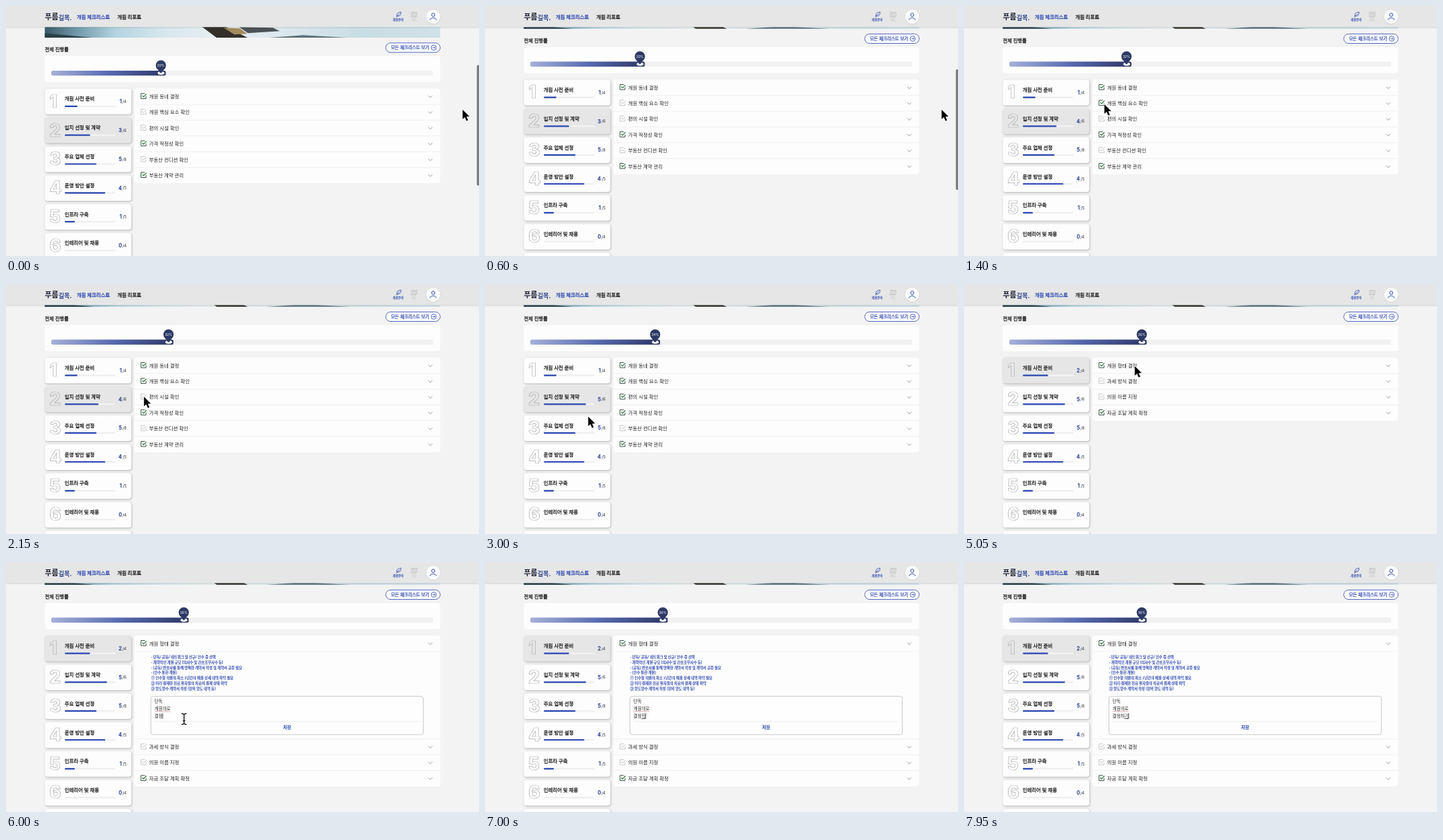
These frames come from a looping animation (700 by 371 pixels, 8 s). An HTML page with a canvas:

```html
<!DOCTYPE html>
<html lang="ko">
<head>
<meta charset="utf-8">
<title>개원 체크리스트</title>
<style>
html, body { margin: 0; width: 100%; height: 100%; overflow: hidden; background: #f3f3f3; }
canvas { display: block; width: 700px; height: 371px; }
</style>
</head>
<body>
<canvas id="stage"></canvas>
<script>
const W = 700, H = 371, LOOP = 8000;
const canvas = document.getElementById('stage');
const ctx = canvas.getContext('2d');
const dpr = window.devicePixelRatio || 1;
canvas.width = Math.round(W * dpr);
canvas.height = Math.round(H * dpr);

const CJK = '"Noto Sans CJK KR", "Noto Sans CJK JP", sans-serif';
const FONT = 'Inter, ' + CJK;
const BLUE = '#2b46b0', INK = '#222', NAVY = '#2d3965', LINE = '#ededed';

const CHECK = { first: 1250, second: 2200, third: 4450 };
const TAB = 3400, OPEN = 5100, FOCUS = 5900;

const cards = [
  ['개원 사전 준비', 1, 4], ['입지 선정 및 계약', 3, 6], ['주요 업체 선정', 5, 8],
  ['운영 방안 설정', 4, 5], ['인프라 구축', 1, 5], ['인테리어 및 채용', 0, 4], ['', 0, 4]
];
// Each item: label and the time from which it is checked
const siteItems = [
  ['개원 동네 결정', 0], ['개원 핵심 요소 확인', CHECK.first], ['편의 시설 확인', CHECK.second],
  ['가격 적정성 확인', 0], ['부동산 컨디션 확인', Infinity], ['부동산 계약 관리', 0]
];
const prepItems = [
  ['개원 형태 결정', CHECK.third], ['과세 방식 결정', Infinity],
  ['의원 이름 지정', Infinity], ['자금 조달 계획 확정', 0]
];
const notes = [
  '- 단독/ 공동/ 네트워크 및 신규/ 인수 중 선택',
  '- 개략적인 개원 규모 (의사수 및 간호조무사수 등)',
  '- [공동] 변호사를 통해 명확한 계약서 작성 및 계약서 공증 필요',
  '- [인수 통한 개원]',
  '① 인수할 의원의 최소 1년간의 매출 상세 내역 파악 필요',
  '② 미리 결제한 진료 환자들의 치료비 결제 상태 파악',
  '③ 양도양수 계약서 작성 (장비 양도 내역 등)'
];
const typing = [[0, ''], [6500, 'ㅎ'], [6700, '하'], [7000, '학'], [7200, '하기']];
const route = [
  [0, 676.5, 154.5], [750, 676.5, 154.5], [1230, 204, 145.5], [1400, 208.5, 146.5],
  [1650, 208.5, 146.5], [2050, 205, 168], [2550, 205, 168], [3000, 153.5, 197.5],
  [3330, 131, 132], [3650, 131, 132], [4200, 207, 121.5], [4550, 207, 121.5],
  [4950, 253.5, 122.5], [5200, 253.5, 122.5], [5800, 263.5, 233], [8000, 263.5, 233]
];

const clamp = v => Math.max(0, Math.min(1, v));
const smooth = u => u * u * (3 - 2 * u);
const ramp = (t, start, length) => smooth(clamp((t - start) / length));

function text(str, x, y, size, color = INK, weight = 400, align = 'left', family = FONT) {
  ctx.font = `${weight} ${size}px ${family}`;
  ctx.letterSpacing = `${-0.01 * size}px`;
  ctx.textAlign = align;
  ctx.fillStyle = color;
  const base = y + size * 0.37;
  ctx.fillText(str, x, base);
  // Thicken the strokes for medium weight
  if (weight === 500) {
    ctx.strokeStyle = color;
    ctx.lineWidth = size * 0.035;
    ctx.strokeText(str, x, base);
  }
  return ctx.measureText(str).width;
}

function box(x, y, w, h, r, fill, stroke, lw = 0.8) {
  ctx.beginPath();
  ctx.roundRect(x, y, w, h, r);
  if (fill) { ctx.fillStyle = fill; ctx.fill(); }
  if (stroke) { ctx.strokeStyle = stroke; ctx.lineWidth = lw; ctx.stroke(); }
}

function poly(points, color, lw, close) {
  ctx.beginPath();
  points.forEach(([x, y], i) => i ? ctx.lineTo(x, y) : ctx.moveTo(x, y));
  if (close) ctx.closePath();
  if (lw) { ctx.strokeStyle = color; ctx.lineWidth = lw; ctx.stroke(); }
  else { ctx.fillStyle = color; ctx.fill(); }
}

function disc(x, y, r, fill, stroke, lw) {
  box(x - r, y - r, 2 * r, 2 * r, r, fill, stroke, lw);
}

function shadow(color, blur, dx, dy) {
  ctx.shadowColor = color;
  ctx.shadowBlur = blur * dpr;
  ctx.shadowOffsetX = dx * dpr;
  ctx.shadowOffsetY = dy * dpr;
}

function gradient(x0, x1, stops) {
  const g = ctx.createLinearGradient(x0, 0, x1, 0);
  stops.forEach(([p, c]) => g.addColorStop(p, c));
  return g;
}

function drawBanner() {
  ctx.save();
  ctx.beginPath();
  ctx.rect(57.5, 0, 585, 33.8);
  ctx.clip();
  ctx.fillStyle = gradient(57, 643, [
    [0, '#3a5866'], [0.08, '#6f98aa'], [0.18, '#b4d3e0'], [0.3, '#d6e7ee'],
    [0.42, '#e6eef0'], [0.6, '#dbe8ed'], [0.8, '#c9dde6'], [1, '#cfe1e9']
  ]);
  ctx.fillRect(57, 0, 586, 34);
  poly([[57, 27], [130, 34], [57, 34]], '#2b4048', 0, true);
  poly([[288, 16], [322, 16], [358, 34], [312, 34]], '#33302c', 0, true);
  poly([[322, 19], [346, 20], [357, 28], [338, 29]], '#a58a5e', 0, true);
  poly([[345, 18], [395, 19], [405, 24], [358, 27]], '#4c5256', 0, true);
  poly([[385, 34], [440, 30], [510, 34]], '#5c727b', 0, true);
  ctx.restore();
}

function drawProgress(value, label) {
  text('전체 진행률', 57.5, 51, 7.3, INK, 500);
  box(562, 41.5, 80.5, 14, 7, '#fefefe', BLUE, 0.8);
  text('모든 체크리스트 보기', 569.7, 48.5, 6.5, BLUE, 500);
  disc(633, 48.5, 3.8, null, BLUE, 0.8);
  poly([[630.8, 48.5], [635, 48.5]], BLUE, 0.7);
  poly([[633.3, 46.7], [635.1, 48.5], [633.3, 50.3]], BLUE, 0.7);

  box(57.5, 61, 585, 38.8, 4, '#fdfdfd');
  box(67, 82.6, 565, 7.4, 2.5, '#f1f1f1');
  const end = 67 + 5.65 * value, x = end - 7.3;
  box(67, 82.6, end - 67, 7.4, 2.5,
    gradient(67, end, [[0, '#a5b1d9'], [0.5, '#586bb0'], [1, '#2d3766']]));
  ctx.beginPath();
  ctx.ellipse(x + 0.3, 86.3, 5, 2.5, 0, 0, 7);
  ctx.fillStyle = '#fff';
  ctx.fill();
  poly([[x - 6.5, 78], [x + 6.5, 78], [x + 1.6, 85.3], [x, 86.4], [x - 1.6, 85.3]], NAVY, 0, true);
  disc(x, 74.8, 7.6, NAVY);
  text(label + '%', x, 74.7, 5.1, '#fff', 400, 'center');
}

function drawCard(i, done, shown, selected) {
  const [title, , total] = cards[i];
  const y = 109.5 + 42.8 * i;
  const shade = Math.round(253 - 23 * selected);
  shadow('rgba(0,0,0,.28)', 3, 0.7, 1);
  box(57.5, y, 128, 38, 4, `rgb(${shade},${shade},${shade})`);
  shadow('transparent', 0, 0, 0);

  ctx.font = `800 26.5px ${FONT}`;
  ctx.letterSpacing = '0px';
  ctx.textAlign = 'left';
  ctx.strokeStyle = '#adadad';
  ctx.lineWidth = 0.7;
  ctx.strokeText(i + 1, 64.2, y + 27.9);

  text(title, 86.8, y + 14.9, 7.4, INK, 500);
  box(87, y + 25, 75, 2.2, 1.1, selected > 0.5 ? '#f4f4f4' : '#eeeeee');
  if (done > 0) box(87, y + 25, 75 * done / total, 2.2, 1.1, BLUE);
  text('/' + total, 178.2, y + 18.9, 6.1, '#333', 400, 'right');
  text(shown, 171.4, y + 18.6, 7.5, '#2a3f96', 500, 'right');
}

function drawItem([label, since], y, t) {
  const on = t >= since;
  ctx.lineJoin = 'round';
  poly([[205.6, y - 4.6], [199.8, y - 4.6], [199.8, y + 3.1], [207.2, y + 3.1], [207.2, y - 0.4]],
    on ? '#2a4035' : '#bababa', on ? 0.9 : 0.8);
  poly([[201.7, y - 1.5], [203.5, y + 0.5], [207.8, y - 3.8]], on ? '#1c7034' : '#b4b4b4', on ? 1.1 : 0.9);
  text(label, 211.8, y - 0.2, 7.4, INK, 400);
  poly([[624.9, y - 1.4], [628, y + 1.6], [631.1, y - 1.4]], '#8a8a8a', 0.8);
}

function drawEditor(t) {
  notes.forEach((line, i) => text(line, 214.8, 141 + 7.78 * i, 5.4, BLUE, 500, 'left', CJK));
  box(214.5, 199.3, 403, 56.8, 3, '#fefefe', '#bbb', 0.8);
  poly([[220, 236.8], [613, 236.8]], '#e6e6e6', 0.7);
  text('저장', 416, 245.8, 6.6, BLUE, 600, 'center');
  text('단독', 219.8, 206.9, 6.5);
  const spell = text('개원의로', 219.8, 217.6, 6.5);
  const typed = typing.filter(step => t >= step[0]).pop()[1];
  const end = 219.8 + text('결정' + typed, 219.8, 228.2, 6.5);
  if (t < FOCUS) return;
  poly([[220, 222], [219.8 + spell, 222]], '#d39a9a', 0.8);
  if (typed) poly([[end - 5.9, 232.5], [end, 232.5]], '#222', 0.8);
  const blinkOn = typed ? t < 7700 || t >= 7900 : (t - FOCUS) % 1000 < 500;
  if (blinkOn) poly([[end + 0.3, 224.3], [end + 0.3, 232.6]], '#222', 0.7);
}

function drawList(t) {
  const items = t < TAB ? siteItems : prepItems;
  const open = t >= OPEN, gap = open ? 130 : 0, row = 23.4;
  box(190, 109.3, 452.5, row * items.length + gap, 4, '#fdfdfd');
  items.forEach((item, i) => {
    const top = 109.3 + row * i + (i ? gap : 0);
    if (i) poly([[190, top], [642.5, top]], LINE, 0.8);
    drawItem(item, top + 11.8, t);
  });
  if (open) {
    poly([[190, 132.7], [642.5, 132.7]], '#f3f3f3', 0.8);
    drawEditor(t);
  }
}

function drawHeader() {
  shadow('rgba(0,0,0,.2)', 2.5, 0, 0.8);
  ctx.fillStyle = '#e6e6e6';
  ctx.fillRect(0, 0, W, 31.3);
  shadow('transparent', 0, 0, 0);
  text('푸름', 57.6, 16, 10.9, '#1b1f30', 900);
  text('길목.', 77.8, 17.2, 9.1, '#2b3f8e', 800);
  text('개원 체크리스트', 104.7, 16, 7.4, BLUE, 500);
  text('개원 리포트', 164.7, 16, 7.4, '#151515', 500);

  // Feather
  ctx.beginPath();
  ctx.moveTo(577.3, 16.5);
  ctx.lineTo(582.5, 11.6);
  ctx.moveTo(578.4, 15.2);
  ctx.quadraticCurveTo(577.5, 9.4, 584.6, 9);
  ctx.quadraticCurveTo(585, 15.4, 578.4, 15.2);
  ctx.strokeStyle = BLUE;
  ctx.lineWidth = 0.8;
  ctx.stroke();
  text('개원준비', 580.2, 20.7, 4.4, BLUE, 500, 'center');

  // Folded map
  poly([[600, 10.2], [602.6, 9], [605.3, 10.2], [608, 9], [608, 15.4], [605.3, 16.6], [602.6, 15.4], [600, 16.6]], '#b7b7b7', 0.8, true);
  poly([[602.6, 9], [602.6, 15.4]], '#b7b7b7', 0.7);
  poly([[605.3, 10.2], [605.3, 16.6]], '#b7b7b7', 0.7);
  text('지도', 604, 20.7, 4.4, '#bdbdbd', 400, 'center');

  shadow('rgba(0,0,0,.15)', 2, 0, 0.5);
  disc(632.2, 15.9, 10.3, '#fdfdfd');
  shadow('transparent', 0, 0, 0);
  disc(632.2, 13.1, 2.4, null, BLUE, 1);
  ctx.beginPath();
  ctx.moveTo(627.5, 21);
  ctx.bezierCurveTo(627.5, 16.5, 636.9, 16.5, 636.9, 21);
  ctx.strokeStyle = BLUE;
  ctx.lineWidth = 1;
  ctx.stroke();
}

function pointerAt(t) {
  let i = 1;
  while (i < route.length - 1 && t > route[i][0]) i++;
  const [t0, x0, y0] = route[i - 1], [t1, x1, y1] = route[i];
  const u = ramp(t, t0, t1 - t0);
  return [x0 + (x1 - x0) * u, y0 + (y1 - y0) * u];
}

function drawPointer(t) {
  if (t >= typing[1][0]) return;
  const [x, y] = pointerAt(t);
  ctx.save();
  ctx.translate(x, y);
  ctx.lineJoin = 'round';
  if (t > OPEN && y > 199) {
    const beam = new Path2D('M-3.6-8Q-.8-8 0-6.6Q.8-8 3.6-8M0-6.6V6.6M-3.6 8Q-.8 8 0 6.6Q.8 8 3.6 8M-1.8 2.6H1.8');
    ctx.strokeStyle = '#fff';
    ctx.lineWidth = 2.8;
    ctx.stroke(beam);
    ctx.strokeStyle = '#111';
    ctx.lineWidth = 1.4;
    ctx.stroke(beam);
  } else {
    const arrow = [[-0.8, -0.8], [-0.8, 13.6], [2.5, 10.6], [4.9, 16], [7.4, 14.9], [5, 9.7], [9.4, 9.5]];
    poly(arrow, '#fff', 1.8, true);
    poly(arrow, '#000', 0, true);
  }
  ctx.restore();
}

function draw(t) {
  const scrolled = 13.3 * ramp(t, 20, 400);
  const first = ramp(t, CHECK.first, 130);
  const second = ramp(t, CHECK.second, 130);
  const third = ramp(t, CHECK.third, 130);
  const tab = ramp(t, TAB, 120);
  const hits = Object.values(CHECK).map(at => t >= at ? 1 : 0);

  ctx.setTransform(dpr, 0, 0, dpr, 0, 0);
  ctx.fillStyle = '#f3f3f3';
  ctx.fillRect(0, 0, W, H);

  ctx.save();
  ctx.translate(0, 13.3 - scrolled);
  drawBanner();
  drawProgress(30 + 2 * (first + second + third), 30 + 2 * (hits[0] + hits[1] + hits[2]));
  cards.forEach(([, base], i) => {
    const grown = [third, first + second][i] || 0;
    const count = [hits[2], hits[0] + hits[1]][i] || 0;
    drawCard(i, base + grown, base + count, [tab, 1 - tab][i] || 0);
  });
  drawList(t);
  ctx.restore();

  drawHeader();
  ctx.globalAlpha = 1 - ramp(t, 600, 200);
  box(696.8, 87.5 + scrolled * 0.48, 3.6, 179, 1.8, '#7c7c7c');
  ctx.globalAlpha = 1;
  drawPointer(t);
}

function tick() {
  draw(performance.now() % LOOP);
  requestAnimationFrame(tick);
}
tick();
</script>
</body>
</html>
```
